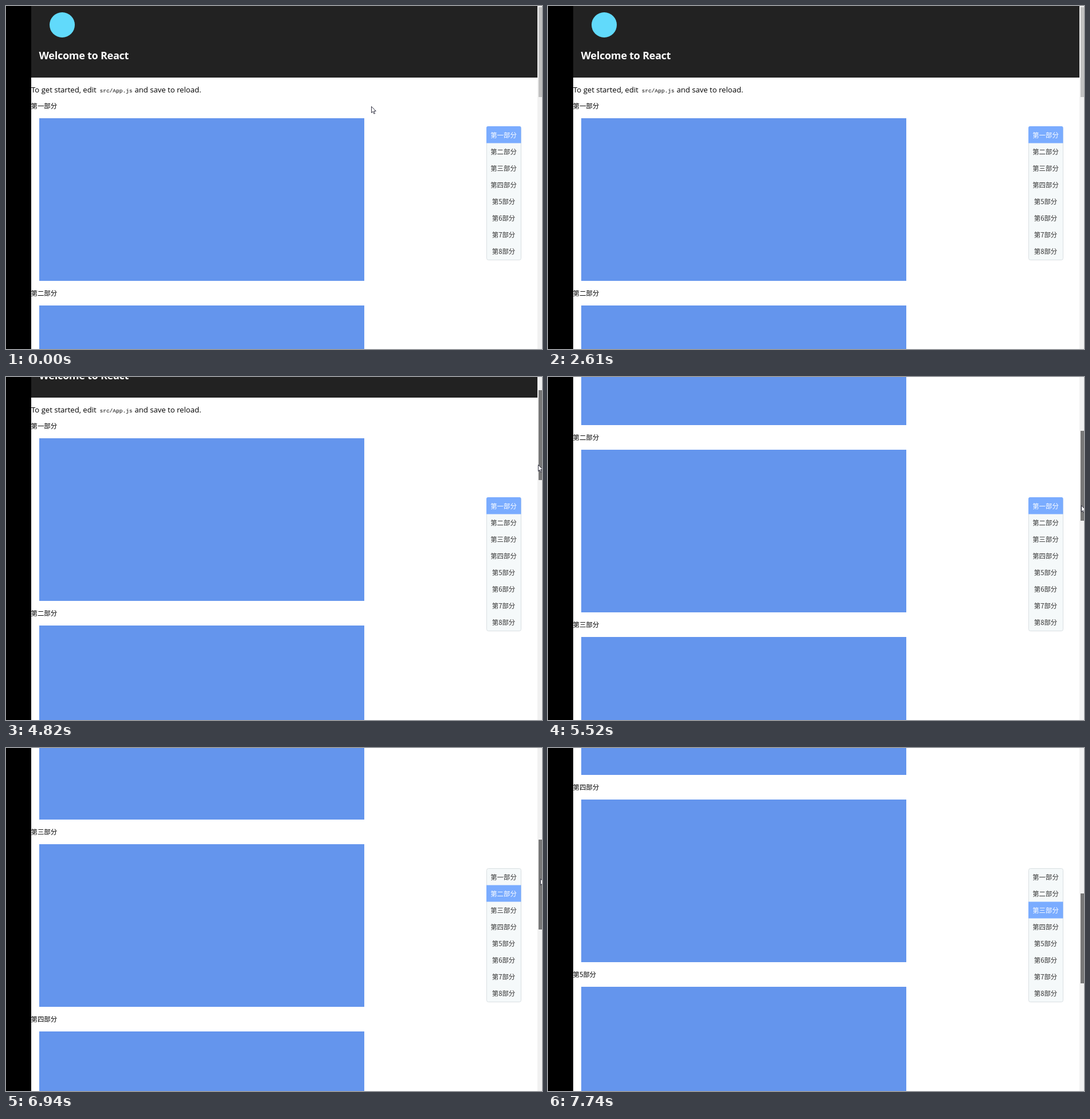
Write an HTML page that moves like this. It is 935 px wide and 599 px high and loops after 8000 ms.

```html
<!DOCTYPE html>
<html lang="zh">
<head>
<meta charset="utf-8">
<title>Section navigation</title>
<style>
  html, body { margin: 0; width: 100%; height: 100%; overflow: hidden; background: #fff; }
  svg { display: block; width: 935px; height: 599px; }
  text { font: 11.4px "Noto Sans CJK SC", "Noto Sans CJK", sans-serif; white-space: pre; }
  text.title { font: bold 18px "Open Sans", "Noto Sans", sans-serif; letter-spacing: -.25px; fill: #fff; }
  text.intro { font: 13.1px "Open Sans", "Noto Sans", sans-serif; }
  text.code { font: 9.5px "Liberation Mono", monospace; }
  #menu text { text-anchor: middle; fill: #333; }
  #menu text.on { fill: #fff; }
</style>
</head>
<body>
<svg viewBox="0 0 935 599">
  <rect width="44" height="599"/>
  <g id="page">
    <rect x="44" width="883" height="125" fill="#222"/>
    <circle cx="98" cy="33" r="22" fill="#61dafb"/>
    <text class="title" x="57.5" y="93">Welcome to React</text>
    <text class="intro" x="44" y="151">To get started, edit</text>
    <text class="code" x="163.5" y="151">src/App.js</text>
    <text class="intro" x="224.5" y="151">and save to reload.</text>
  </g>
  <g id="menu">
    <rect x="838.5" y="210.5" width="60" height="233" rx="3" fill="#f5f9fa" stroke="#d9dfe2"/>
    <path id="mark" fill="#7aacff"/>
  </g>
  <rect x="927" width="8" height="599" fill="#f1f1f1"/>
  <rect id="thumb" x="929" width="6" height="157"/>
  <path id="cursor" d="M.5 .5V11.5L3 9.2L4.9 13.3L6.6 12.5L4.8 8.5H8.3Z" fill="#fff" stroke="#223" stroke-width=".9"/>
</svg>
<script>
const LOOP = 8000, PITCH = 327, THUMB_RATE = 0.232;
const names = [..."一二三四5678"].map(n => `第${n}部分`);
const $ = id => document.getElementById(id);
const page = $("page"), menu = $("menu"), mark = $("mark"), thumb = $("thumb"), cursor = $("cursor");

function add(parent, tag, attrs, text = "") {
  const el = document.createElementNS("http://www.w3.org/2000/svg", tag);
  for (const key in attrs) el.setAttribute(key, attrs[key]);
  el.textContent = text;
  return parent.appendChild(el);
}

const items = names.map((name, i) => {
  const top = 196 + i * PITCH;
  add(page, "text", { x: 43.5, y: top - 17 }, name);
  add(page, "rect", { x: 58, y: top, width: 567, height: 284, fill: "#6495ed" });
  return add(menu, "text", { x: 868, y: 230 + i * 29 }, name);
});

// [time, scroll offset]
const scrollKeys = [
  [0, 0], [4600, 0], [4820, 88], [5020, 256], [5270, 256], [5520, 396], [6060, 478],
  [6530, 478], [6940, 681], [7340, 974], [7390, 987], [7540, 987], [7740, 1087], [LOOP, 1087]
];
// [time, x, y]; y is relative to the thumb's travel
const cursorKeys = [
  [0, 637, 175], [1460, 637, 175], [1510, 690, 283], [1560, 745, 370], [1610, 793, 457],
  [1660, 828, 559], [1710, 828, 559], [3220, 850, 557], [3320, 821, 396], [3370, 801, 356],
  [3420, 770, 298], [3600, 820, 210], [3770, 869, 160], [4170, 901, 147], [4300, 928, 132],
  [4820, 928, 132], [5520, 930, 132], [6140, 930, 132], [6370, 931, 70], [6940, 932, 70],
  [7340, 935, 70], [LOOP, 936, 70]
];

function at(keys, t) {
  const i = keys.findIndex(key => key[0] > t);
  const a = keys[i - 1], b = keys[i], f = (t - a[0]) / (b[0] - a[0]);
  return a.slice(1).map((v, k) => v + (b[k + 1] - v) * f);
}

function thumbColor(t) {
  if (t < 4290) return "#c1c1c1";
  return t < 4600 || (t >= 6200 && t < 6530) ? "#a8a8a8" : "#787878";
}

function draw(t) {
  const scroll = Math.round(at(scrollKeys, t)[0]);
  const travel = scroll * THUMB_RATE;
  const active = t < 6140 ? 0 : scroll < 805 ? 1 : 2;
  const [x, y] = at(cursorKeys, t);

  page.setAttribute("transform", `translate(0 ${-scroll})`);
  thumb.setAttribute("y", Math.round(2 + travel));
  thumb.setAttribute("fill", thumbColor(t));
  mark.setAttribute("d", active
    ? `M838 ${210.5 + active * 29}h60.5v29h-60.5z`
    : "M838 239.5V213q0 -3 3 -3h54.5q3 0 3 3v26.5z");
  items.forEach((item, i) => item.classList.toggle("on", i === active));
  cursor.setAttribute("transform", `translate(${Math.round(x)} ${Math.round(y + travel)})`);
  cursor.style.display = t >= 1710 && t < 3220 ? "none" : "";
}

const start = performance.now();
function tick() {
  draw((performance.now() - start) % LOOP);
  requestAnimationFrame(tick);
}
tick();
</script>
</body>
</html>
```
